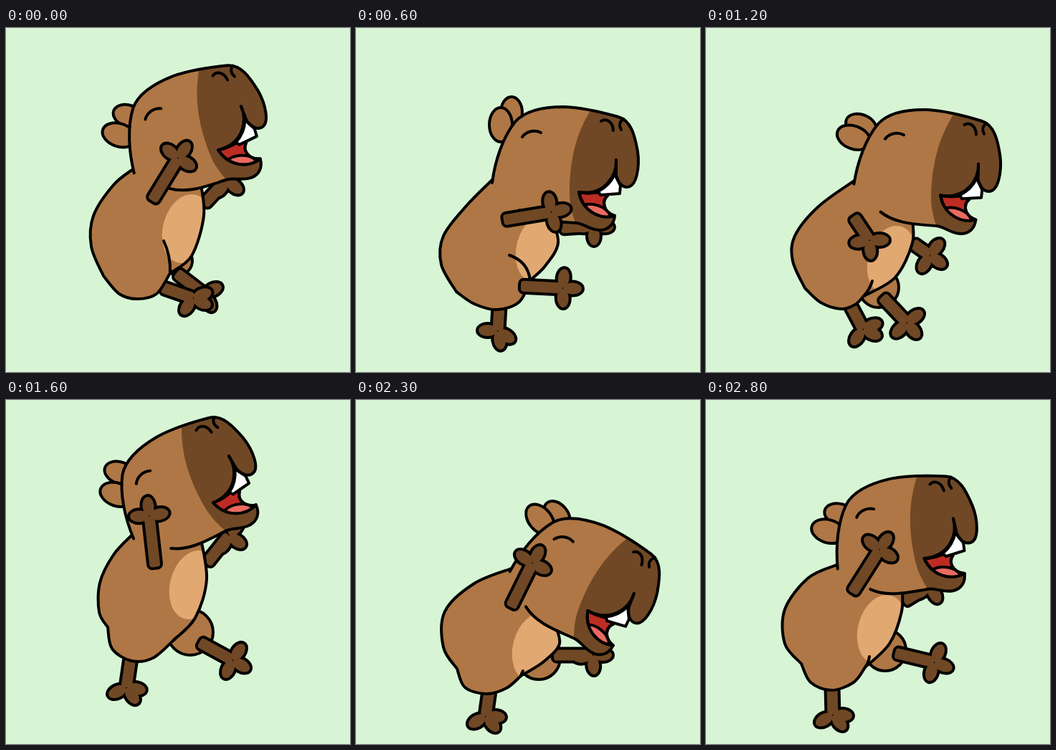
An HTML page with a canvas that plays this animation: 480 px wide and 480 px high, repeating every 2900 ms.

```html
<!DOCTYPE html>
<html lang="en">
<head>
<meta charset="utf-8">
<title>Dancing capybara</title>
<style>
html, body { margin: 0; height: 100%; overflow: hidden; background: #d7f5d5; }
canvas { display: block; width: 100vw; height: 100vh; }
</style>
</head>
<body>
<canvas id="stage" width="480" height="480"></canvas>
<script>
const ctx = document.getElementById('stage').getContext('2d');
const FUR = '#af7745', DARK = '#704825', BELLY = '#e1a872', INK = '#000';
const RAD = Math.PI / 180;
// Directions of the three fingers or toes, relative to the turn of the limb's end.
const SPREAD = [-85, 0, 85], STANDING = [-46, 0, 100];

// head: eye x, y, angle. ears: front x, y, back x, y, tilt (relative to the eye).
// Limbs: base x, y, palm x, y, turn of the hand or foot.
const lean = {
  head: [205, 119, -21.5], ears: [-55, 11, -33, -9, -50],
  back: [150, 219, 122, 262, 119, 305, 136, 346],
  rump: [158, 371, 183, 378, 210, 371, 229, 342],
  front: [259, 318, 276, 262], fold: [230, 318, 220, 297],
  belly: [252, 280], thigh: [240, 325, 20],
  nearArm: [204, 241, 240, 182, -55], farArm: [276, 246, 308, 212, 40],
  legA: [218, 362, 261, 377, 25], legB: [238, 342, 276, 371, 60], over: 0
};
const stride = {
  head: [245, 148, 0], ears: [-43, -13, -28, -30, 0],
  back: [155, 247, 122, 290, 119, 330, 140, 368],
  rump: [165, 385, 197, 393, 228, 382, 243, 352],
  front: [264, 332, 282, 300], fold: [240, 326, 214, 317],
  belly: [257, 307], thigh: [225, 345, 18],
  nearArm: [206, 268, 272, 257, -12], farArm: [286, 279, 332, 276, 90],
  legA: [200, 388, 198, 422, 80], legB: [230, 360, 288, 363, 2], over: 1
};
const crouch = {
  head: [263, 151, 1.3], ears: [-57, 3, -47, -14, -70],
  back: [157, 249, 124, 290, 121, 325, 138, 363],
  rump: [160, 383, 188, 392, 208, 386, 220, 374],
  front: [264, 348, 288, 300], fold: [229, 364, 232, 353],
  belly: [259, 324], thigh: [241, 362, 28],
  nearArm: [206, 263, 228, 296, 85], farArm: [288, 300, 312, 317, 35],
  legA: [200, 384, 219, 420, 25], legB: [246, 375, 280, 411, 50], over: 0
};
const leap = {
  head: [191, 107, -30.5], ears: [-44, 3, -25, -21, -40],
  back: [150, 216, 131, 255, 130, 296, 142, 317],
  rump: [148, 347, 175, 364, 205, 360, 234, 335],
  front: [264, 304, 280, 250], fold: [235, 334, 236, 333],
  belly: [262, 258], thigh: [257, 324, 32],
  nearArm: [208, 233, 200, 162, -96], farArm: [280, 228, 311, 189, 35],
  legA: [174, 360, 168, 401, 55], legB: [270, 338, 316, 363, 30], over: 0
};
const land = {
  head: [250, 156, -4.5], ears: [-38, -17, -14, -30, -5],
  back: [152, 258, 119, 297, 119, 338, 134, 359],
  rump: [142, 386, 172, 399, 200, 390, 218, 374],
  front: [262, 342, 287, 298], fold: [225, 366, 227, 357],
  belly: [255, 320], thigh: [258, 346, 30],
  nearArm: [208, 261, 225, 196, -76], farArm: [270, 260, 300, 245, 0],
  legA: [168, 395, 166, 433, 52], legB: [273, 349, 326, 362, 20], over: 0
};
const bow = {
  head: [290, 195, 20.5], ears: [-41, -15, -21, -29, -60],
  back: [165, 256, 124, 295, 122, 345, 141, 375],
  rump: [152, 401, 182, 410, 210, 402, 230, 385],
  front: [262, 365, 284, 340], fold: [231, 382, 233, 378],
  belly: [252, 345], thigh: [255, 360, 30],
  nearArm: [216, 289, 246, 228, -60], farArm: [276, 356, 330, 356, 85],
  legA: [186, 406, 181, 441, 50], legB: [200, 370, 225, 355, 0], over: 0
};
const rise = {
  head: [222, 157, -13], ears: [-56, 14, -35, -5, -60],
  back: [143, 248, 110, 292, 110, 340, 133, 368],
  rump: [146, 394, 175, 405, 206, 394, 222, 373],
  front: [256, 340, 273, 295], fold: [227, 366, 228, 358],
  belly: [245, 320], thigh: [250, 349, 29],
  nearArm: [204, 269, 242, 209, -55], farArm: [276, 281, 312, 259, 60],
  legA: [176, 402, 177, 439, 50], legB: [264, 353, 318, 366, 20], over: 0
};

// Start time in ms, two poses and the share of the second.
const steps = [
  [0, lean, lean, 0], [200, lean, leap, .9], [400, leap, stride, .35],
  [600, stride, stride, 0], [800, stride, bow, .6], [1000, crouch, bow, 1.15],
  [1200, crouch, crouch, 0], [1400, crouch, leap, .38], [1600, leap, leap, 0],
  [1800, leap, land, .65], [2000, land, land, 0], [2100, land, bow, 1.3],
  [2300, bow, bow, 0], [2500, bow, rise, .3], [2700, bow, rise, .75],
  [2800, rise, rise, 0]
];

function mix(a, b, k) {
  if (typeof a === 'number') return a + (b - a) * k;
  if (Array.isArray(a)) return a.map((v, i) => mix(v, b[i], k));
  return Object.fromEntries(Object.keys(a).map(key => [key, mix(a[key], b[key], k)]));
}

function paint(path, fill, stroke = INK) {
  if (fill) { ctx.fillStyle = fill; ctx.fill(path); }
  if (stroke) { ctx.strokeStyle = stroke; ctx.lineWidth = 4; ctx.stroke(path); }
}

function ellipse(x, y, rx, ry, tilt = 0) {
  const path = new Path2D();
  path.ellipse(x, y, rx, ry, tilt * RAD, 0, 7);
  return path;
}

function inside(clip, draw) {
  ctx.save();
  ctx.clip(clip);
  draw();
  ctx.restore();
}

// Smooth curve through flat x, y pairs, with sharp ends.
function through(path, flat) {
  const p = [];
  for (let i = 0; i < flat.length; i += 2) p.push([flat[i], flat[i + 1]]);
  for (let i = 0; i + 1 < p.length; i++) {
    const [a, b, c, d] = [p[i - 1] || p[i], p[i], p[i + 1], p[i + 2] || p[i + 1]];
    path.bezierCurveTo(b[0] + (c[0] - a[0]) / 6, b[1] + (c[1] - a[1]) / 6,
      c[0] - (d[0] - b[0]) / 6, c[1] - (d[1] - b[1]) / 6, c[0], c[1]);
  }
}

function limb([x, y, px, py, turn], spread = SPREAD) {
  const angle = Math.atan2(py - y, px - x), length = Math.hypot(px - x, py - y);
  const bone = new Path2D();
  bone.roundRect(0, -7.5, length, 15, 4);
  const lobes = spread.map(offset => {
    const a = turn * RAD - angle + offset * RAD;
    return ellipse(length + Math.cos(a) * 14, Math.sin(a) * 14, 13, 8, a / RAD);
  });
  const parts = [bone, ...lobes];
  ctx.save();
  ctx.translate(x, y);
  ctx.rotate(angle);
  ctx.strokeStyle = INK;
  ctx.lineWidth = 8;
  parts.forEach(part => ctx.stroke(part));
  ctx.fillStyle = DARK;
  parts.forEach(part => ctx.fill(part));
  ctx.restore();
}

const skull = 'M190 216C194 185 205 152 222 131C236 115 262 110 290 110' +
  'C315 111 345 118 366 124C384 129 389 150 393 172C396 193 392 222 378 222C368 222 362 208 363 200';
const jaw = 'C360 274 352 282 340 282C325 281 320 274 308 272C280 270 250 271 228 254';
const headFill = new Path2D(skull + 'L351 234C343 241 344 256 361 262' + jaw + 'Z');
const headLine = new Path2D(skull + 'L363 184M361 262' + jaw);
const muzzle = new Path2D('M334 105C305 145 298 190 298 230C298 250 303 262 312 290H420V105Z');
const mouth = new Path2D('M311 229C322 232 332 230 340 229L351 234C343 241 344 256 361 262C340 268 316 255 311 229Z');
const tooth = new Path2D('M361 204L369 220L368 231L341 233L338 228Q354 220 361 204Z');
const features = new Path2D('M363 184C364 205 348 234 311 229M232 152C237 145 248 141 258 146' +
  'M342 130C348 126 358 129 359 143M373 127C367 131 367 137 370 142');

function head() {
  paint(headFill, FUR, null);
  inside(headFill, () => paint(muzzle, DARK, null));
  paint(mouth, '#bd2c22');
  inside(mouth, () => paint(ellipse(334, 258, 21, 11, 18), '#e96a61'));
  paint(mouth);
  paint(tooth, '#fff');
  paint(headLine);
  paint(features);
}

function bodyPath(pose) {
  const [x, y, angle] = pose.head;
  const c = Math.cos(angle * RAD), s = Math.sin(angle * RAD);
  const onHead = (u, v) => [x + u * c - v * s, y + u * s + v * c];
  const nape = onHead(-53, 62), throat = onHead(27, 112);
  const path = new Path2D();
  path.moveTo(...nape);
  through(path, [...nape, ...pose.back]);
  through(path, [...pose.back.slice(-2), ...pose.rump]);
  through(path, [...pose.rump.slice(-2), ...pose.front, ...throat]);
  path.lineTo(...onHead(0, 70));
  path.closePath();
  return path;
}

function onHead([x, y, angle], draw) {
  ctx.save();
  ctx.translate(x, y);
  ctx.rotate(angle * RAD);
  ctx.translate(-245, -148);
  draw();
  ctx.restore();
}

function draw(pose) {
  ctx.fillStyle = '#d7f5d5';
  ctx.fillRect(0, 0, 480, 480);
  ctx.lineCap = ctx.lineJoin = 'round';

  const [fx, fy, bx, by, tilt] = pose.ears;
  onHead(pose.head, () => {
    paint(ellipse(245 + bx, 148 + by, 15, 22, tilt), FUR);
    paint(ellipse(245 + fx, 148 + fy, 16, 24, tilt), FUR);
  });
  const [tx, ty, r] = pose.thigh;
  paint(ellipse(tx, ty, r, r), FUR);
  limb(pose.farArm);
  if (pose.over < .5) limb(pose.legB);
  limb(pose.legA, STANDING);

  const body = bodyPath(pose);
  paint(body, FUR, null);
  inside(body, () => paint(ellipse(...pose.belly, 33, 49, 15), BELLY, null));
  paint(body);
  const fold = new Path2D();
  fold.moveTo(...pose.rump.slice(-2));
  fold.quadraticCurveTo(...pose.fold);
  paint(fold);

  if (pose.over >= .5) limb(pose.legB);
  onHead(pose.head, head);
  limb(pose.nearArm);
}

function tick() {
  const t = performance.now() % 2900;
  const [, a, b, k] = steps.findLast(step => step[0] <= t);
  draw(mix(a, b, k));
  requestAnimationFrame(tick);
}
tick();
</script>
</body>
</html>
```
